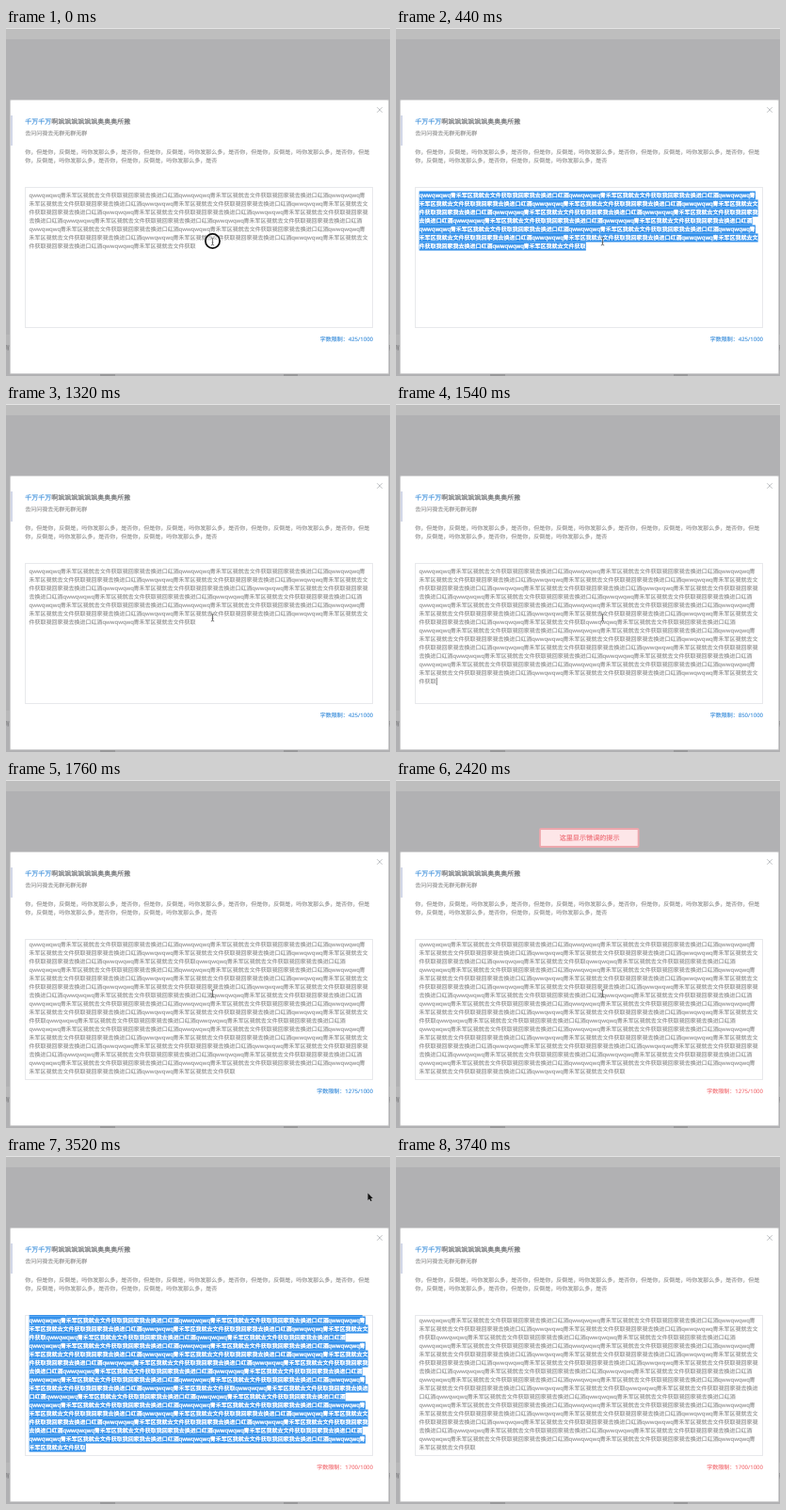
These frames come from a looping animation (408x370 px, 4400 ms). An HTML page:

```html
<!DOCTYPE html>
<html lang="zh-CN">
<head>
<meta charset="utf-8">
<title>字数限制</title>
<style>
  html, body { margin: 0; width: 100%; height: 100%; overflow: hidden; background: #b1b1b3; }
  svg { display: block; width: 100%; height: 100%; }
  text {
    font: 6px "Noto Sans", "Noto Sans CJK SC", "Noto Sans CJK", sans-serif;
    text-rendering: geometricPrecision;
    white-space: pre;
    fill: #929292;
    stroke: #929292;
    stroke-width: .12;
  }
  .title { font-size: 7px; font-weight: 500; fill: #606266; stroke: #606266; }
  .title tspan, .blue { fill: #3d8fdb; stroke: #3d8fdb; }
  .red { fill: #f27479; stroke: #f27479; }
  .picked text { fill: #fff; stroke: #fff; stroke-width: .35; }
  .picked rect { fill: #3592ec; }
  #toast text { font-size: 7.1px; font-weight: 500; fill: #ee7078; stroke: #ee7078; text-anchor: middle; }
  #count { text-anchor: end; }
  #p1, #p2 { font-size: 6.01px; }
</style>
</head>
<body>
<svg viewBox="0 0 408 370" xmlns="http://www.w3.org/2000/svg">
  <defs>
    <clipPath id="clip"><rect x="21" y="169" width="369" height="149"/></clipPath>
  </defs>

  <!-- dimmed page -->
  <rect width="408" height="370" fill="#b1b1b3"/>
  <rect width="408" height="12" fill="#bebebe"/>
  <rect width="408" height="1" fill="#e4e4e4"/>
  <rect y="326" width="408" height="11" fill="#b8b8b9"/>
  <text x="-2" y="342.3" style="fill:#77777a">有</text>
  <text x="405.5" y="342.3" style="fill:#77777a">回</text>
  <path d="M100 369h16M295 369h15" stroke="#98989a" stroke-width="2"/>

  <!-- dialog -->
  <rect x="4" y="76" width="403" height="292" rx="1.5" fill="#d2d2d3"/>
  <rect x="5" y="77" width="401" height="290" rx="1" fill="#fff"/>
  <rect x="5" y="93" width="2" height="32" fill="#d3d8e8"/>
  <path d="M394.2 84.2l5.6 5.6m0-5.6l-5.6 5.6" stroke="#bfc1c5" stroke-width=".9"/>
  <text class="title" x="20.3" y="102"><tspan>千万千万</tspan>啊飒飒飒飒飒飒奥奥奥所撒</text>
  <text x="20.3" y="113.6">去问问我去无群无群无群</text>
  <text id="p1" x="20.3" y="134.3"></text>
  <text id="p2" x="20.3" y="143.3"></text>
  <rect x="20.5" y="169.5" width="369" height="149" fill="#fff" stroke="#e8e9ec"/>
  <g clip-path="url(#clip)"><g id="area"></g></g>
  <text id="count" x="390" y="333.2"></text>

  <g id="toast">
    <rect x="153" y="52" width="104.6" height="19" rx="1" fill="#fde6e8" stroke="#eda7ad" stroke-width="1.8"/>
    <text x="205.6" y="64.2">这里显示错误的提示</text>
  </g>

  <!-- pointers -->
  <circle id="press" cx="219.5" cy="226.5" r="7.6" fill="#fff" fill-opacity=".35" stroke="#111" stroke-width="1.7"/>
  <g id="beam" fill="none">
    <path d="M219.5 223v8" stroke="#fff" stroke-width="2" opacity=".5"/>
    <path d="M217.8 223q1.7 0 1.7 1.2q0-1.2 1.7-1.2M219.5 224v6M217.8 231q1.7 0 1.7-1.2q0 1.2 1.7 1.2M218.6 228h1.8" stroke="#444" stroke-width=".7"/>
  </g>
  <path id="arrow" d="M384.5 39.5v7.6l1.7-1.6 1.2 2.6 1.3-.6-1.2-2.5h2.3z" fill="#111"/>
</svg>

<script>
const $ = id => document.getElementById(id);

const LOOP = 4400, LEFT = 24.6, WIDTH = 361.5, LINE = 9;
const FIRST = 178, LAST = 310;
const HAN = 5.985, LATIN = 33.2;

const word = 'qwwqwqwq';
const unit = word + '青禾军区我就去文件获取我回家我去换进口红酒';
const block = unit.repeat(14) + unit.slice(0, 19);

const phrase = '你，但是你，反倒是，吗你发那么多，是否';
const para = phrase.repeat(5);
$('p1').textContent = para.slice(0, 61);
$('p2').textContent = para.slice(61);

// Breaks text into lines of runs; the Latin word never splits.
function wrap(str) {
  const lines = [{ runs: [], end: 0 }];
  let latin = null;
  for (const part of str.match(/[a-z]+|[^a-z]/g)) {
    const isLatin = part === word;
    const w = isLatin ? LATIN : HAN;
    let line = lines[lines.length - 1];
    if (line.end + w > WIDTH) {
      line = { runs: [], end: 0 };
      lines.push(line);
    }
    if (!line.runs.length || isLatin !== latin) line.runs.push({ x: line.end, str: '' });
    line.runs[line.runs.length - 1].str += part;
    line.end += w;
    latin = isLatin;
  }
  return lines;
}
const layouts = [1, 2, 3, 4].map(n => wrap(block.repeat(n)));

function drawArea({ copies, picked, caret }) {
  const lines = layouts[copies - 1];
  const bottom = FIRST + LINE * (lines.length - 1);
  const top = FIRST - Math.max(0, bottom - LAST);
  const yOf = i => top + i * LINE;
  let out = '';
  if (picked) lines.forEach((l, i) => {
    out += `<rect x="${LEFT}" y="${yOf(i) - 4.5}" width="${l.end + .4}" height="${LINE + .1}"/>`;
  });
  lines.forEach((l, i) => {
    const runs = l.runs.map(r => `<tspan x="${LEFT + r.x}">${r.str}</tspan>`).join('');
    out += `<text y="${yOf(i) + 2.3}">${runs}</text>`;
  });
  if (caret) {
    const x = LEFT + lines[lines.length - 1].end + .3;
    out += `<rect x="${x}" y="${yOf(lines.length - 1) - 4}" width=".7" height="8" style="fill:#555"/>`;
  }
  $('area').innerHTML = out;
  $('area').setAttribute('class', picked ? 'picked' : '');
}

// Each step changes only the listed properties.
const start = { copies: 1, picked: false, caret: false, over: false, press: true,
                beam: true, arrow: false, toast: 0, shift: 0 };
const steps = [
  [0, {}],
  [220, { press: false }],
  [440, { picked: true }],
  [1320, { picked: false }],
  [1540, { copies: 2, caret: true }],
  [1760, { copies: 3, caret: false }],
  [1980, { over: true, toast: .5, shift: 6 }],
  [2200, { toast: 1, shift: 0, caret: true }],
  [2420, { caret: false }],
  [2640, { copies: 4, picked: true }],
  [2860, { toast: .5, shift: -2 }],
  [3080, { toast: 0 }],
  [3520, { beam: false, arrow: true }],
  [3740, { picked: false, arrow: false }]
];
let state = start;
const states = steps.map(([at, change]) => (state = { ...state, ...change, at }));

const show = (id, on) => $(id).setAttribute('visibility', on ? 'visible' : 'hidden');

function draw(s) {
  drawArea(s);
  $('count').textContent = `字数限制：${s.copies * block.length}/1000`;
  $('count').setAttribute('class', s.over ? 'red' : 'blue');
  $('toast').setAttribute('opacity', s.toast);
  $('toast').setAttribute('transform', `translate(0 ${s.shift})`);
  for (const id of ['press', 'beam', 'arrow']) show(id, s[id]);
}

let shown = null;
function tick() {
  const t = performance.now() % LOOP;
  const s = states.filter(v => v.at <= t).pop();
  if (s !== shown) draw(shown = s);
  requestAnimationFrame(tick);
}
tick();
</script>
</body>
</html>
```
